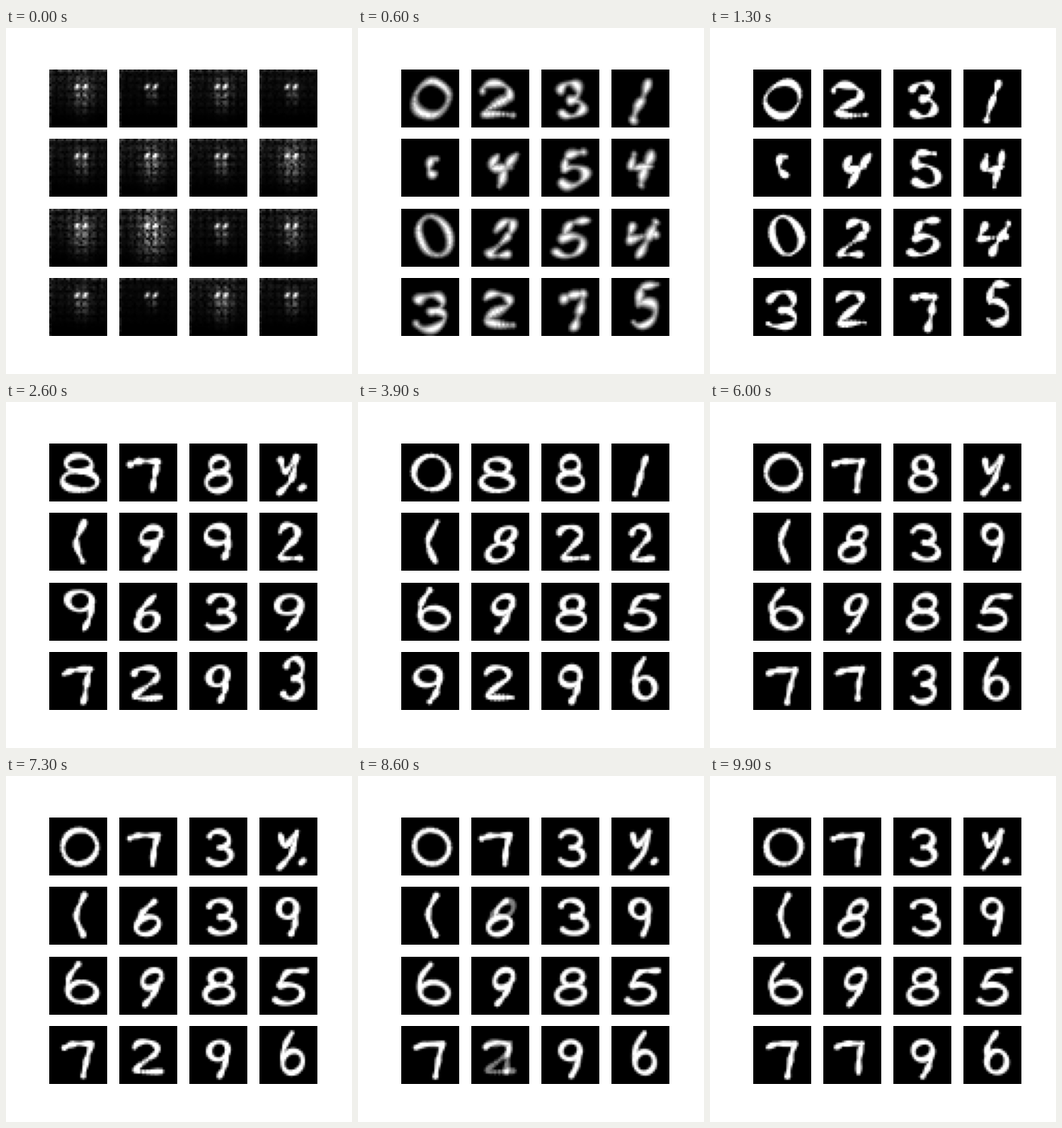
Recreate the animation shown at these times as a matplotlib script. Size 400x400 px, loop 10000 ms.

```python
import numpy as np
import matplotlib.pyplot as plt
from matplotlib.animation import FuncAnimation

FRAMES, STEP = 100, 100
KEYS = (13, 26, 39, 60, 73, 99)   # epochs at which a sample settles on a digit
N = 28                            # samples are N x N
CELL = 67 / N                     # boxes below are in units of 1/67 sample
GX, GY = np.meshgrid(np.arange(N), np.arange(N))


def arc(cx, cy, rx, ry, start, end):
    a = np.radians(np.linspace(start, end, 36))
    return np.column_stack([cx + rx * np.cos(a), cy + ry * np.sin(a)])


def run(*xy):
    """Smooth curve through a few points."""
    p = np.reshape(xy, (-1, 2))
    q = np.vstack([p[0], p, p[-1]])
    u = np.linspace(0, 1, 9)[:, None]
    return np.vstack([0.5 * (2 * b + (c - a) * u + (2 * a - 5 * b + 4 * c - d) * u**2
                             + (3 * b - a - 3 * c + d) * u**3)
                      for a, b, c, d in zip(q, q[1:], q[2:], q[3:])])


# Pen strokes in a unit box, y downwards
GLYPHS = {
    "0": [arc(.5, .5, .5, .5, 0, 360)],
    "1": [run(.75, 0, .5, .45, .2, 1)],
    "2": [arc(.45, .25, .42, .25, 190, 400), run(.77, .41, .1, .92, 1, .95)],
    "3": [arc(.5, .25, .42, .25, 200, 450), arc(.5, .74, .5, .26, 270, 510)],
    "4": [run(.1, .1, .05, .5, .9, .4), run(.9, 0, .7, .5, .55, 1)],
    "5": [run(1, 0, .35, .05, .12, .45), arc(.45, .71, .52, .29, 235, 500)],
    "6": [run(.4, 0, .05, .35, .02, .7), arc(.5, .73, .48, .27, 180, 540)],
    "7": [run(0, .18, .3, .08, .9, .06), run(.9, .06, .8, .5, .75, 1)],
    "8": [arc(.5, .24, .36, .24, 0, 360), arc(.5, .74, .5, .27, 0, 360)],
    "9": [arc(.42, .26, .42, .26, 0, 360), run(.84, .26, .75, .7, .55, 1)],
    "(": [run(.9, 0, .1, .5, .8, 1)],
    "c": [arc(.6, .45, .55, .22, 70, 290)],
    "y": [run(.1, .1, .3, .4, .9, 0), run(.85, .1, .6, .6, .05, 1), run(1.2, .8, 1.1, .85)],
}

# Digit at each key epoch, box centre, width, height, slant, reach of the first glow
SAMPLES = [
    ("080000", 35, 34, 40, 39, 0, 1.1), ("278777", 30, 36, 36, 36, 0, .6),
    ("388833", 34, 35, 28, 38, 0, 1), ("1y1yyy", 34, 37, 24, 42, 0, .7),
    ("c(((((", 36, 33, 12, 46, 0, .9), ("498868", 36, 36, 26, 38, .35, 1.2),
    ("592333", 36, 35, 30, 38, -.1, .9), ("422999", 35, 35, 24, 40, 0, 1.3),
    ("096666", 38, 31, 34, 44, -.05, 1.3), ("269999", 36, 35, 24, 40, .35, 1.7),
    ("538888", 35, 34, 32, 38, .1, .8), ("495555", 35, 35, 32, 38, .15, 1.1),
    ("379777", 33, 38, 34, 40, .1, .9), ("222727", 32, 36, 32, 36, 0, .5),
    ("799399", 35, 38, 26, 40, .1, 1.1), ("536666", 39, 31, 24, 46, .05, .8),
]


def trace(cell, i):
    """Pen points and radii of one sample at key epoch i, in grid units."""
    digits, cx, cy, w, h, slant, _ = SAMPLES[cell]
    rng = np.random.default_rng([cell, i])
    wobble = 0.25 + 0.8 * np.exp(-KEYS[i] / 16)   # young strokes are blotchy
    points, radii = [], []
    for stroke in GLYPHS[digits[i]]:
        x, y = ((stroke - 0.5) * (w, h)).T
        points.append(np.column_stack([cx + x - slant * y, cy + y]) / CELL - 0.5)
        s = np.linspace(0, 4 * np.pi, len(stroke))
        radii.append(1.3 + wobble * np.sin(s + rng.uniform(0, 2 * np.pi)))
    return np.vstack(points), np.concatenate(radii)


TRACES = [[trace(c, i) for i in range(len(KEYS))] for c in range(len(SAMPLES))]


def ink(cell, i, x, y, soft):
    points, radii = TRACES[cell][i]
    d = np.hypot(x[..., None] - points[:, 0], y[..., None] - points[:, 1])
    return np.clip(0.5 + (radii - d).max(axis=-1) / soft, 0, 1)


def lattice(cell):
    """Checkered glow of an untrained upsampling network."""
    rng = np.random.default_rng(cell)
    s = SAMPLES[cell][-1]
    noise = rng.random((N, N))
    dots = ((1 + np.cos((GX - 1) * np.pi / 2)) * (1 + np.cos(GY * np.pi / 2)) / 4)**0.8
    glow = np.exp(-((GX - 15.5) / (4 * s))**2 - ((GY - 11) / (7 * s))**2)
    img = glow * (0.35 * dots + 0.25 * s * noise)
    img += 0.09 * np.clip(1.1 - GY / 22, 0, 1) * (dots + noise) * min(s, 1.2)
    img += 0.15 * noise * ((GX == 0) | (GY == 0))
    for x in (13, 17):
        img += 0.9 * np.exp(-(GX - x)**2 - 0.8 * (GY - 7.7)**2 - 0.9 * (GX - x) * (GY - 7.7))
    return np.clip(img, 0, 1)


def sample(cell, t):
    i = int(np.searchsorted(KEYS, t))
    start = KEYS[i - 1] if i else 0
    u = (t - start) / (KEYS[i] - start)

    # Each epoch bends the digit a little differently, less so as training goes on
    bend = 0.15 + 0.7 * np.exp(-t / 18)
    p = np.random.default_rng([cell, t]).uniform(0, 2 * np.pi, 4)
    x = GX + bend * (np.sin(GY / 4 + p[0]) + 0.6 * np.sin(GX / 3 + p[1]))
    y = GY + bend * (np.sin(GX / 4 + p[2]) + 0.6 * np.sin(GY / 3 + p[3]))

    if i == 0:
        img = ink(cell, 0, x, y, 1 + 4 * (1 - u)**1.5)
        first = max(0, 1 - t / 3)
        return first * lattice(cell) + (1 - first) * img / img.max()
    w = u * u * (3 - 2 * u)
    img = (1 - w) * ink(cell, i - 1, x, y, 1) + w * ink(cell, i, x, y, 1)
    return img / img.max()


fig, axes = plt.subplots(4, 4, figsize=(4, 4), dpi=100)
views = []
for ax in axes.flat:
    ax.axis("off")
    views.append(ax.imshow(np.zeros((N, N)), cmap="gray", vmin=0, vmax=1))


def update(t):
    for cell, view in enumerate(views):
        view.set_data(sample(cell, t))
    return views


anim = FuncAnimation(fig, update, frames=FRAMES, interval=STEP, repeat=True, repeat_delay=0)
plt.show()
```
